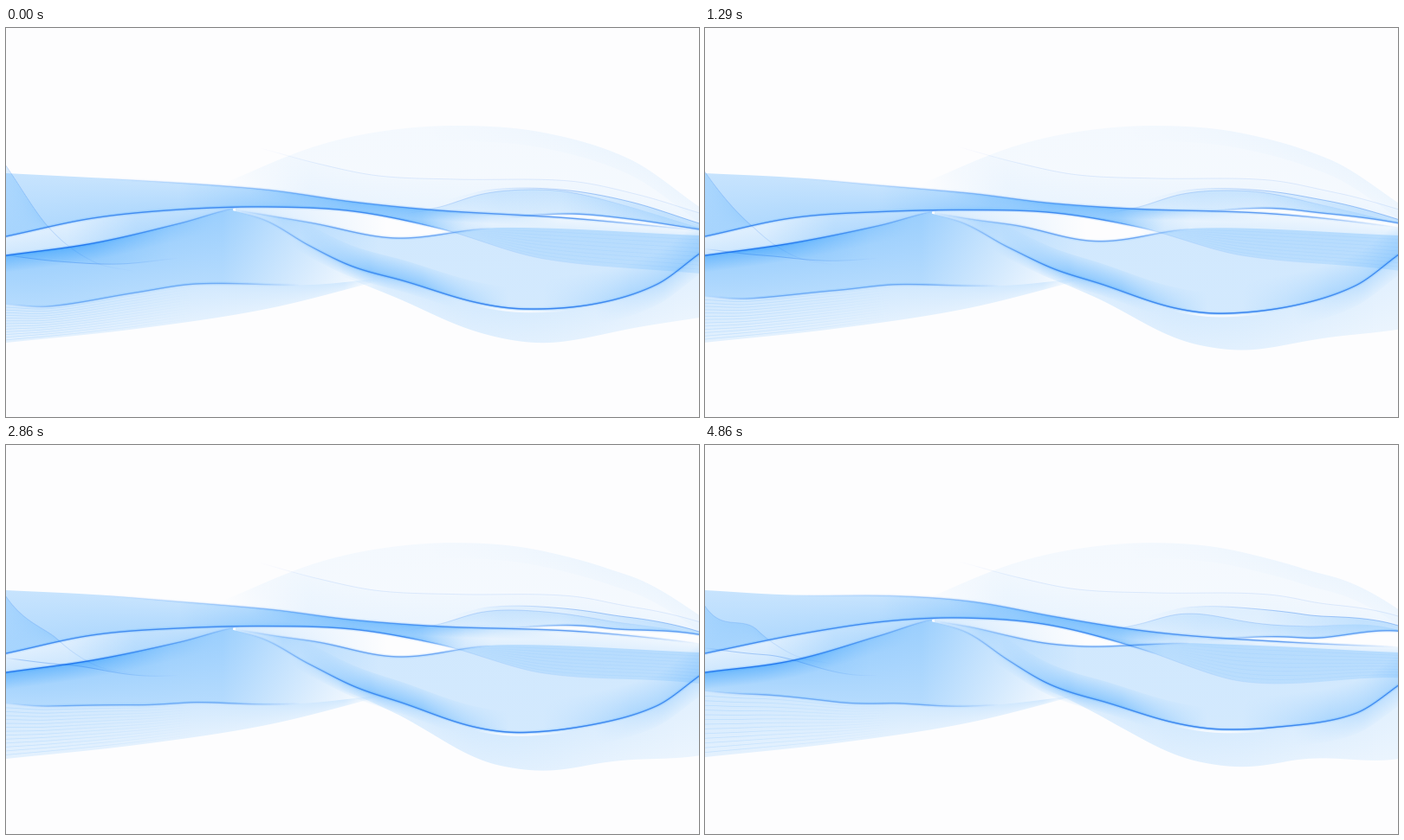
Write an HTML page with a canvas that moves like this. It is 800 px wide and 450 px high and loops after 5000 ms.

```html
<!DOCTYPE html>
<html lang="en">
<head>
<meta charset="utf-8">
<title>Blue waves</title>
<style>
html, body { margin: 0; width: 100%; height: 100%; overflow: hidden; background: #fdfdfe; }
canvas { display: block; }
</style>
</head>
<body>
<canvas id="stage" width="800" height="450"></canvas>
<script>
const ctx = document.getElementById('stage').getContext('2d');
const FRAMES = 35, FILL = '20,143,252', INK = '14,102,234';
let u = 0; // progress through the loop, 0 to 1

// Shapes of the movement along x
const ramp = (x, a, b) => {
  const t = Math.max(0, Math.min(1, (x - a) / (b - a)));
  return t * t * (3 - 2 * t);
};
const bump = (x, centre, width) => Math.exp(-(((x - centre) / width) ** 2));

// Movements shared by several curves
const swell = () => 4 * u * (1 - u);
const sway = x => 7 * Math.sin((x - 450) / 108) * ramp(x, 0, 200) * (u - swell());
const slide = x => -17 * u * ramp(x, 690, 800);

// A smooth curve through a few key points, moved up and down over time
function curve(keys, move) {
  const slope = i => {
    const [x0, y0] = keys[Math.max(0, i - 1)], [x1, y1] = keys[Math.min(keys.length - 1, i + 1)];
    return (y1 - y0) / (x1 - x0);
  };
  return x => {
    let i = 0;
    while (i < keys.length - 2 && x > keys[i + 1][0]) i++;
    const [x0, y0] = keys[i], [x1, y1] = keys[i + 1];
    const w = x1 - x0, f = (x - x0) / w, d = y1 - y0, m = slope(i) * w, n = slope(i + 1) * w;
    return y0 + f * (m + f * (3 * d - 2 * m - n + f * (m + n - 2 * d))) + move(x);
  };
}

const roof = curve([[0, 168], [150, 176], [300, 187], [400, 201], [500, 211], [650, 220], [800, 234]],
  x => sway(x) - 5 * swell() * ramp(x, 500, 800));
const crest = curve([[0, 241], [100, 220], [200, 210], [300, 207], [400, 212], [500, 232], [620, 267], [800, 284]],
  x => sway(x) - 14 * u * ramp(x, 600, 800));
const rise = curve([[0, 263], [100, 249], [200, 226], [265, 208], [300, 206]], sway);
const dip = curve([[250, 208], [350, 225], [450, 243], [570, 231], [800, 240]],
  x => sway(x) * ramp(x, 400, 300) + bump(x, 460, 80) * (8 * swell() - 10 * u));
const keel = curve([[250, 208], [300, 223], [350, 252], [400, 276], [460, 293], [540, 317], [600, 325], [680, 319], [750, 297], [800, 261]],
  x => sway(x) * ramp(x, 400, 300) + 8 * swell() * bump(x, 540, 120) + u * u * (4 + 13 * ramp(x, 650, 800)) * ramp(x, 350, 450));
const belly = curve([[380, 284], [450, 312], [530, 347], [590, 362], [640, 363], [730, 346], [800, 335]],
  x => (8 * swell() + 8 * u) * ramp(x, 450, 570) + u * (20 * ramp(x, 670, 800) - 6 * ramp(x, 480, 400)));
const hem = curve([[0, 364], [150, 348], [300, 325], [440, 290]], () => -3 * u * u);
const shelf = curve([[0, 320], [50, 322], [150, 306], [220, 296], [350, 297], [430, 290]],
  x => u * (6 * bump(x, 280, 70) - 35 * ramp(x, 210, 30)));
const arch = curve([[250, 180], [350, 139], [430, 120], [520, 113], [620, 121], [720, 152], [800, 207]],
  x => slide(x) + 4 * u * bump(x, 660, 80));
const veil = curve([[290, 138], [360, 157], [430, 171], [520, 175], [650, 177], [730, 193], [800, 214]],
  x => 0.7 * slide(x) - 4 * u);
const dome = curve([[450, 217], [500, 207], [550, 192], [600, 187], [650, 190], [720, 207], [800, 231]],
  x => slide(x) + 18 * u * u * bump(x, 640, 70));
const cap = curve([[500, 201], [560, 187], [640, 187], [720, 201], [800, 226]],
  x => slide(x) + 3 * u * bump(x, 640, 60));
const lens = curve([[560, 220], [650, 215], [720, 221], [800, 233]],
  x => sway(x) + slide(x) - 4 * swell());
const under = curve([[0, 263], [60, 270], [130, 273], [200, 266]], x => -28 * u * ramp(x, 200, 70));
const fold = curve([[0, 160], [50, 232], [100, 270], [150, 282]], x => u * (27 - 55 * ramp(x, 0, 60)));

// Ways to combine curves
const low = (f, g) => x => Math.max(f(x), g(x));
const high = (f, g) => x => Math.min(f(x), g(x));
const shift = (f, dy) => x => f(x) + dy;
const mix = (f, g, k) => x => f(x) + (g(x) - f(x)) * k;
const join = (f, x0, g) => x => x < x0 ? f(x) : g(x);

const leftTop = join(rise, 262, keel);
const hood = join(roof, 560, high(roof, lens));
const roofEnd = join(crest, 262, high(crest, dip));

const fade = (x, x0, x1, left, right) =>
  Math.min(1, left ? (x - x0 + 1) / left : 1, right ? (x1 - x) / right : 1);

// A vertical gradient between two curves, drawn column by column
function ribbon(top, bottom, x0, x1, left, right, aTop, aBottom) {
  for (let x = x0; x < x1; x++) {
    const y = top(x), h = bottom(x) - y;
    if (h <= 0) continue;
    const g = ctx.createLinearGradient(0, y, 0, y + h);
    g.addColorStop(0, `rgba(${FILL},${aTop})`);
    g.addColorStop(1, `rgba(${FILL},${aBottom})`);
    ctx.globalAlpha = fade(x, x0, x1, left, right);
    ctx.fillStyle = g;
    ctx.fillRect(x, y, 1, h);
  }
}

function line(f, x0, x1, left, right, width, alpha, color = INK) {
  ctx.fillStyle = `rgb(${color})`;
  for (let x = x0; x < x1; x++) {
    const y = f(x), h = width * Math.hypot(1, f(x + 1) - y);
    ctx.globalAlpha = alpha * fade(x, x0, x1, left, right);
    ctx.fillRect(x, y - h / 2, 1, h);
  }
}

// A bright edge with a soft glow
function edge(f, x0, x1, left, right, alpha) {
  line(f, x0, x1, left, right, 4, alpha * 0.2, FILL);
  line(f, x0, x1, left, right, 1.4, alpha);
}

function strands(f, g, n, x0, x1, left, right, alpha) {
  for (let k = 1; k < n; k++) line(mix(f, g, k / n), x0, x1, left, right, 0.8, alpha, FILL);
}

function draw() {
  ctx.globalAlpha = 1;
  ctx.fillStyle = '#fdfdfe';
  ctx.fillRect(0, 0, 800, 450);

  // Pale veils above
  ribbon(arch, hood, 250, 800, 40, 0, 0.04, 0.03);
  ribbon(arch, shift(arch, 18), 480, 800, 200, 0, 0.03, 0.02);
  ribbon(low(arch, veil), hood, 290, 800, 60, 0, 0.02, 0.05);
  line(veil, 290, 800, 80, 0, 1, 0.1);
  ribbon(dome, hood, 455, 800, 30, 0, 0.12, 0.06);
  ribbon(cap, hood, 510, 800, 60, 0, 0.07, 0.03);
  ribbon(cap, lens, 640, 800, 120, 0, 0.14, 0.14);
  line(dome, 460, 740, 60, 80, 1, 0.18);
  line(cap, 540, 800, 120, 0, 1, 0.32);

  // Upper ribbon
  ribbon(roof, roofEnd, 0, 560, 0, 80, 0.23, 0.33);
  ribbon(roof, crest, 200, 530, 130, 60, 0.18, 0.2);
  ribbon(roof, shift(roof, 12), 280, 640, 120, 120, 0.28, 0);
  ribbon(fold, crest, 0, 110, 0, 30, 0.16, 0.06);
  ribbon(roof, dip, 500, 800, 60, 0, 0.06, 0.12);

  // Light gaps below the crest
  ribbon(crest, rise, 0, 265, 0, 0, 0.12, 0.2);
  ribbon(crest, rise, 70, 275, 80, 20, 0.14, 0.14);
  ribbon(crest, dip, 265, 440, 0, 150, 0.13, 0.16);

  // Main body
  ribbon(leftTop, shelf, 0, 430, 0, 180, 0.42, 0.31);
  ribbon(rise, shift(rise, 20), 0, 240, 0, 170, 0.34, 0);
  ribbon(rise, under, 0, 190, 0, 90, 0.14, 0.1);
  ribbon(dip, keel, 265, 800, 0, 0, 0.19, 0.18);
  ribbon(dip, keel, 270, 430, 50, 110, 0.16, 0.12);
  ribbon(dip, crest, 480, 800, 40, 0, 0.14, 0.12);
  ribbon(shift(keel, -24), keel, 340, 580, 80, 100, 0.06, 0.36);
  ribbon(shift(keel, -38), keel, 620, 800, 100, 0, 0, 0.2);
  ribbon(keel, shift(keel, 13), 330, 520, 60, 90, 0.26, 0.03);
  strands(dip, crest, 9, 540, 800, 60, 0, 0.05);

  // Pale skirts
  ribbon(shelf, hem, 0, 430, 0, 40, 0.19, 0.11);
  strands(shelf, hem, 14, 0, 220, 0, 180, 0.13);
  ribbon(keel, belly, 385, 800, 40, 0, 0.13, 0.08);
  ribbon(keel, belly, 400, 780, 40, 240, 0.05, 0.06);
  ribbon(keel, shift(keel, 24), 680, 800, 80, 0, 0.16, 0.02);
  line(shift(keel, 3), 540, 650, 35, 45, 2.5, 0.8, '253,253,254');

  // Bright edges
  edge(roof, 100, 800, 400, 140, 0.6);
  edge(crest, 0, 520, 0, 60, 0.66);
  line(crest, 480, 720, 0, 220, 1, 0.12);
  edge(rise, 0, 270, 0, 180, 0.8);
  line(rise, 100, 270, 60, 40, 1, 0.18);
  edge(dip, 265, 560, 120, 60, 0.5);
  edge(keel, 265, 800, 130, 0, 0.62);
  line(keel, 480, 740, 90, 90, 1.6, 0.3);
  edge(shelf, 0, 340, 70, 90, 0.42);
  line(under, 0, 200, 20, 100, 1, 0.28);
  line(fold, 0, 150, 0, 90, 1, 0.14);
  edge(lens, 580, 800, 80, 0, 0.55);
}

let shown = -1;
function tick(now) {
  const n = Math.floor((now % 5000 + 3) * FRAMES / 5000) % FRAMES;
  if (n !== shown) {
    shown = n;
    u = n / (FRAMES - 1);
    draw();
  }
  requestAnimationFrame(tick);
}
tick(0);
</script>
</body>
</html>
```
